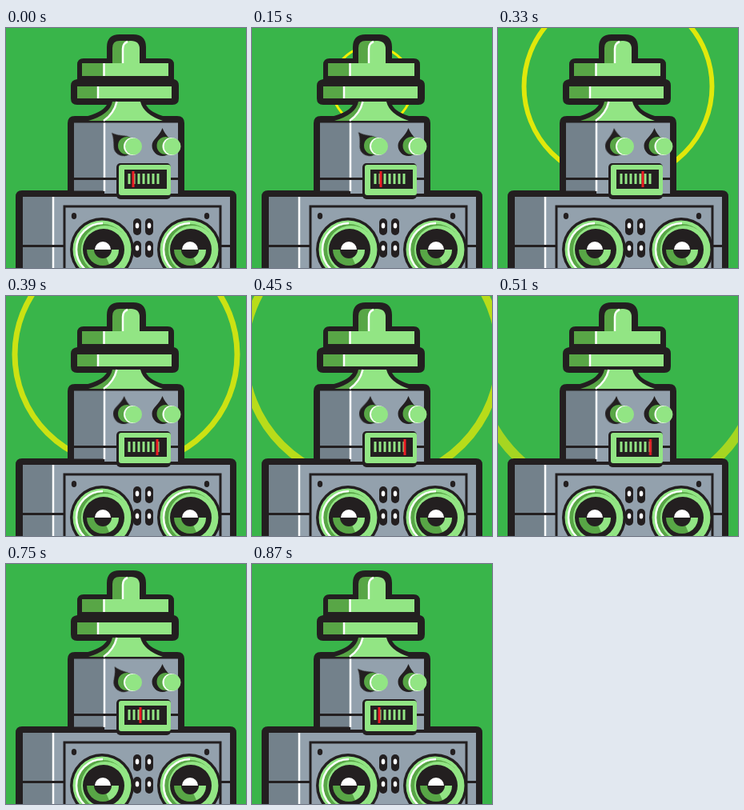
Animation, 300 px wide and 300 px high, one loop 0.9 s. Source, as an HTML page:

```html
<!DOCTYPE html>
<html lang="en">
<head>
<meta charset="utf-8">
<title>Robot radio</title>
<style>
  html, body { margin: 0; width: 100%; height: 100%; overflow: hidden; background: #39b54a; }
  svg { display: block; width: 100vw; height: 100vh; }

  .ink { fill: #231f20; }
  .lite { fill: #92e584; }
  .shade { fill: #58a646; }
  .steel { fill: #93a1ad; }
  .dusk { fill: #73818b; }
  .white { fill: #fff; }
  .line { fill: none; stroke: #231f20; stroke-width: 3; }
  .shine { fill: none; stroke: #fff; stroke-width: 2.5; }

  .wave { fill: none; stroke: #fff200; animation: wave .9s infinite; }
  .needle { animation: needle .9s infinite; }
  .dial { animation: dial .9s infinite; }

  /* Every segment advances in 30 ms steps. */
  @keyframes wave {
    0%      { r: 27px; stroke-width: 2px; opacity: .9; animation-timing-function: step-end; }
    10%     { r: 27px; stroke-width: 2px; opacity: .9; animation-timing-function: steps(2); }
    16.667% { r: 50px; stroke-width: 3px; opacity: .95; animation-timing-function: steps(4); }
    30%     { r: 96px; stroke-width: 4.8px; opacity: .95; animation-timing-function: steps(4); }
    43.333% { r: 139px; stroke-width: 7px; opacity: .74; animation-timing-function: steps(4); }
    56.667% { r: 180px; stroke-width: 12px; opacity: .55; animation-timing-function: steps(4); }
    70%     { r: 221px; stroke-width: 14px; opacity: .25; animation-timing-function: steps(3); }
    80%, 100% { r: 245px; stroke-width: 15px; opacity: 0; }
  }
  @keyframes needle {
    0%      { transform: translateX(0); animation-timing-function: step-end; }
    10%     { transform: translateX(0); animation-timing-function: steps(2); }
    16.667% { transform: translateX(2px); animation-timing-function: steps(4); }
    30%     { transform: translateX(14px); animation-timing-function: steps(4); }
    43.333% { transform: translateX(30px); animation-timing-function: steps(2); }
    50%     { transform: translateX(32px); animation-timing-function: steps(2); }
    56.667% { transform: translateX(31.5px); animation-timing-function: steps(4); }
    70%     { transform: translateX(26.5px); animation-timing-function: steps(4); }
    83.333% { transform: translateX(9px); animation-timing-function: steps(4); }
    96.667%, 100% { transform: translateX(0); }
  }
  @keyframes dial {
    0%      { transform: rotate(-43deg); animation-timing-function: step-end; }
    10%     { transform: rotate(-43deg); animation-timing-function: steps(2); }
    16.667% { transform: rotate(-40deg); animation-timing-function: steps(4); }
    30%     { transform: rotate(-12deg); animation-timing-function: steps(4); }
    43.333% { transform: rotate(2deg); animation-timing-function: steps(4); }
    56.667% { transform: rotate(3deg); animation-timing-function: steps(4); }
    70%     { transform: rotate(-6deg); animation-timing-function: steps(4); }
    83.333% { transform: rotate(-31deg); animation-timing-function: steps(4); }
    96.667%, 100% { transform: rotate(-43deg); }
  }
</style>
</head>
<body>
<svg viewBox="0 0 300 300">
  <defs>
    <path id="pointer" class="ink" d="M-13 0C-13 -8-4 -11 0 -22C4 -11 13 -8 13 0A13 13 0 0 1-13 0Z"/>
    <g id="knob">
      <path d="M4 0L10 1" stroke="#58a646" stroke-width="22" stroke-linecap="round"/>
      <circle class="white" cx="11" cy="1" r="11"/>
      <circle class="lite" cx="12.500" cy="1" r="10.500"/>
    </g>
    <g id="speaker">
      <circle class="ink" cx="-1" r="40"/>
      <circle class="lite" cx="-1" r="36.500"/>
      <circle class="shade" r="32"/>
      <path class="shine" d="M0 33A33 33 0 0 1 0 -33"/>
      <circle class="lite" cx="3" r="30"/>
      <circle class="ink" cx="1" r="26"/>
      <path class="shade" d="M-20 0A20 20 0 0 0 20 0Z"/>
      <path class="lite" d="M0 0H20A20 20 0 0 1 8 18.300Z"/>
      <circle class="ink" r="11"/>
      <path class="white" d="M-10 0A10 10 0 0 1 10 0Z"/>
    </g>
    <g id="vent">
      <rect class="ink" x="-5" width="10" height="21" rx="5"/>
      <ellipse class="white" cy="9" rx="2.300" ry="3.500"/>
    </g>
  </defs>

  <rect width="300" height="300" fill="#39b54a"/>
  <circle class="wave" cx="150" cy="73" r="27"/>

  <!-- antenna -->
  <path class="ink" d="M126 38V24Q126 8 142 8H159Q175 8 175 24V38H202Q210 38 210 46V64Q216 65 216 72V88Q216 96 208 96H175Q180 106 200 111V122H98V111Q120 106 126 96H89Q81 96 81 88V72Q81 65 89 64V46Q89 38 97 38Z"/>
  <path class="shade" d="M133 44V25Q133 16 142 16H156V44Z"/>
  <path class="lite" d="M146 44V26Q146 16 156 16Q167 16 167 26V44Z"/>
  <path class="shine" d="M146 44V26Q146 19 152 17"/>
  <rect class="shade" x="95" y="44" width="27" height="16"/>
  <rect class="lite" x="122" y="44" width="81" height="16"/>
  <path class="shine" d="M122.500 44V60"/>
  <rect class="shade" x="89" y="73" width="26" height="15"/>
  <rect class="lite" x="115" y="73" width="92" height="15"/>
  <path class="shine" d="M115 73V88"/>

  <!-- head -->
  <path class="ink" d="M77 212V119Q77 110 86 110H214Q223 110 223 119V212Z"/>
  <path class="shade" d="M133 92H140Q136 108 122 116H103Q130 108 133 92Z"/>
  <path class="lite" d="M139 92H168Q172 108 196 116H122Q136 108 139 92Z"/>
  <path class="shine" d="M138.500 92Q135 107 122 116"/>
  <rect class="dusk" x="85" y="118.500" width="38" height="85"/>
  <rect class="steel" x="123" y="118.500" width="92" height="88.500"/>
  <path class="shine" d="M123 118.500V204"/>
  <path class="line" d="M85 188.500H140M205 188.500H215"/>

  <!-- body -->
  <path class="ink" d="M12 300V211Q12 203 20 203H85V211H215V203H280Q288 203 288 211V300Z"/>
  <rect class="steel" x="21" y="211" width="259" height="89"/>
  <rect class="dusk" x="21" y="211" width="38" height="89"/>
  <path class="shine" d="M59 211V300"/>
  <path class="line" d="M21 272.500H72M268 272.500H280"/>

  <!-- face -->
  <g transform="translate(147 147)">
    <g class="dial"><use href="#pointer"/></g>
    <use href="#knob"/>
  </g>
  <g transform="translate(195.500 147)">
    <use href="#pointer"/>
    <use href="#knob"/>
  </g>
  <rect class="ink" x="138" y="169" width="68" height="45" rx="5"/>
  <rect class="lite" x="141" y="171" width="65" height="38" rx="3"/>
  <rect class="ink" x="148" y="177" width="53" height="24"/>
  <path d="M154 182V195M160 182V195M166 182V195M172 182V195M178 182V195M184 182V195M190 182V195" stroke="#92e584" stroke-width="3"/>
  <rect class="needle" x="157.500" y="179" width="3" height="20" fill="#ed1c24"/>

  <!-- stereo -->
  <path class="line" d="M73 300V223H268V300"/>
  <ellipse class="ink" cx="85" cy="235" rx="3.200" ry="4"/>
  <ellipse class="ink" cx="251" cy="235" rx="3.200" ry="4"/>
  <use href="#vent" x="164" y="238"/>
  <use href="#vent" x="179" y="238"/>
  <use href="#vent" x="164" y="266"/>
  <use href="#vent" x="179" y="266"/>
  <use href="#speaker" x="121" y="277"/>
  <use href="#speaker" x="230" y="277"/>
</svg>
</body>
</html>
```
